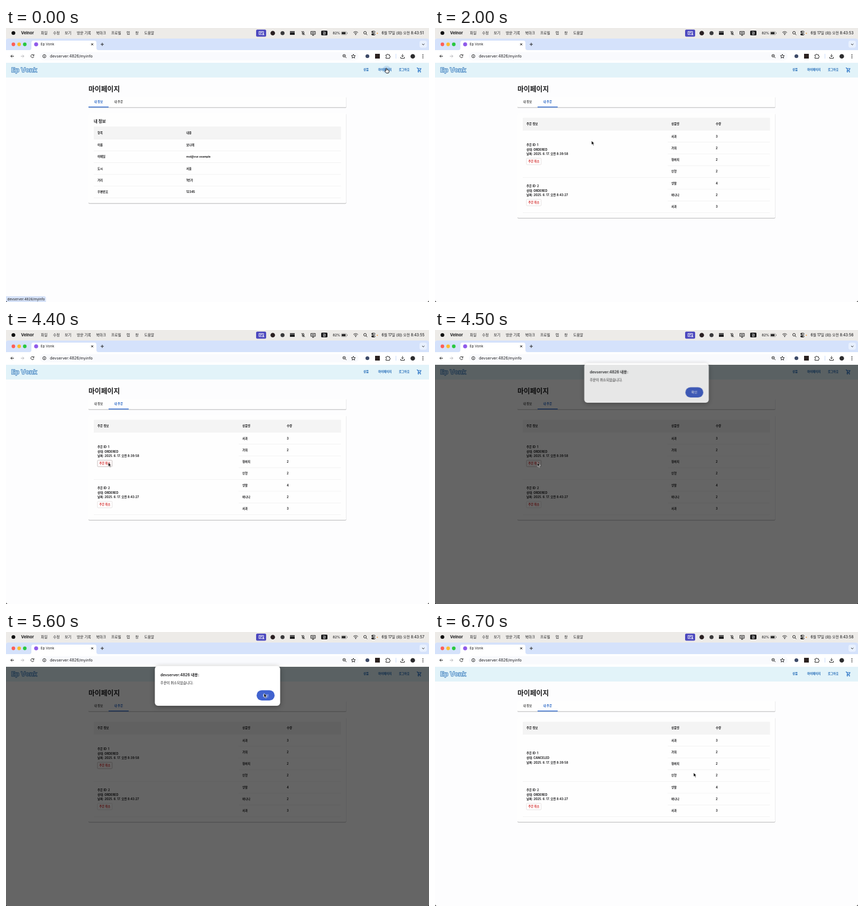
An HTML page that plays this animation: 800x520 px, repeating every 7500 ms.

```html
<!DOCTYPE html>
<html>
<head>
<meta charset="utf-8">
<title>My page</title>
<style>
html, body { margin: 0; width: 100%; height: 100%; overflow: hidden; background: #222; }
svg { display: block; width: 800px; height: 520px; }
text { font-family: Inter, "Noto Sans CJK KR", "Noto Sans CJK JP", sans-serif; fill: #1d1d1f; white-space: pre; }
.menu { font-size: 6.8px; font-weight: 500; }
.bar { font-size: 7.3px; }
.page { font-size: 5.5px; font-weight: 700; }
.nav text { fill: #1b66b5; }
.date { letter-spacing: .06px; }
.mid { text-anchor: middle; }
.line { fill: none; stroke: #1f1f1f; stroke-width: 1; }
.rule { fill: none; stroke: #ececec; stroke-width: .7; }
.paper { fill: #fefefe; filter: drop-shadow(0 1.1px .35px rgba(0,0,0,.3)); }
.btn rect { fill: #fff; stroke: #dfdada; stroke-width: .8; }
.btn text { fill: #d32f2f; font-size: 5.3px; }

.a { animation: 7.5s step-end infinite; }
#cursor { animation-name: move; }
#hand { animation-name: hand; }
#arrow { animation-name: arrow; }
#hover { animation-name: hover; }
#status { animation-name: status; }
#info { animation-name: before; }
#orders { animation-name: after; }
#tab1 { animation-name: tabOff; }
#tab2 { animation-name: tabOn; }
#mark { animation-name: slide; }
#open { animation-name: open; }
#done { animation-name: done; }
#press { animation-name: press; }
#dim { animation-name: dim; }
#alert { animation-name: alert; transform-origin: 400px 102px; }
#ok { animation-name: ok; }
#tick { animation-name: tick; }

@keyframes move {
  0% { transform: translate(718px,76px); animation-timing-function: steps(8); }
  10.667%, 21.333% { transform: translate(212px,137px); animation-timing-function: steps(2); }
  24% { transform: translate(260px,150px); animation-timing-function: steps(2); }
  26.667%, 29.333% { transform: translate(296px,214px); animation-timing-function: steps(3); }
  33.333%, 37.333% { transform: translate(299px,221px); animation-timing-function: steps(8); }
  48%, 60% { transform: translate(193.5px,251.5px); animation-timing-function: steps(6); }
  68%, 74.667% { transform: translate(488px,116.5px); animation-timing-function: step-end; }
  76%, 84% { transform: translate(489px,118px); animation-timing-function: steps(4); }
  89.333%, 100% { transform: translate(489px,267px); }
}
@keyframes hand { 0% { opacity: 1 } 1.333% { opacity: 0 } 9.333% { opacity: 1 } 22.667%, 100% { opacity: 0 } }
@keyframes arrow { 0% { opacity: 0 } 1.333% { opacity: 1 } 9.333% { opacity: 0 } 22.667%, 100% { opacity: 1 } }
@keyframes hover { 0% { opacity: 1 } 1.333%, 100% { opacity: 0 } }
@keyframes status { 0% { opacity: 1 } 8% { opacity: 1; animation-timing-function: steps(3) } 12%, 100% { opacity: 0 } }
@keyframes before { 0% { opacity: 1 } 14.667%, 100% { opacity: 0 } }
@keyframes after { 0% { opacity: 0 } 14.667%, 100% { opacity: 1 } }
@keyframes tabOff { 0% { fill: #2463c4 } 14.667%, 100% { fill: #4a4a4a } }
@keyframes tabOn { 0% { fill: #4a4a4a } 14.667%, 100% { fill: #2463c4 } }
@keyframes slide {
  0% { transform: none }
  14.667% { transform: none; animation-timing-function: cubic-bezier(.4,0,.2,1) }
  18.667%, 100% { transform: translateX(38px) }
}
@keyframes open { 0% { opacity: 1 } 78.667%, 100% { opacity: 0 } }
@keyframes done { 0% { opacity: 0 } 78.667%, 100% { opacity: 1 } }
@keyframes press { 0% { fill: #fff; stroke: #dfdada } 48%, 100% { fill: #fefafa; stroke: #b9b0b0 } }
@keyframes dim { 0% { opacity: 0 } 60% { opacity: .6 } 76%, 100% { opacity: 0 } }
@keyframes alert {
  0% { opacity: 0; transform: translateY(-2px) scale(.994) }
  60% { opacity: .85; transform: translateY(-1.8px) scale(.994) }
  61.333% { opacity: 1; transform: none }
  76% { opacity: .97; transform: translateY(-1.8px) scale(.994) }
  77.333%, 100% { opacity: 0 }
}
@keyframes ok { 0% { fill: #3858c4 } 69.333% { fill: #4163cf } 76%, 100% { fill: #6068c8 } }
@keyframes tick {
  0% { transform: none }
  6.667% { transform: translateY(-12px) }
  20% { transform: translateY(-24px) }
  33.333% { transform: translateY(-36px) }
  46.667% { transform: translateY(-48px) }
  60% { transform: translateY(-60px) }
  73.333% { transform: translateY(-72px) }
  86.667%, 100% { transform: translateY(-84px) }
}
</style>
</head>
<body>
<svg viewBox="0 0 800 520">
  <defs>
    <clipPath id="win"><rect y="20" width="800" height="500" rx="4"/></clipPath>
    <clipPath id="digit"><rect x="780" y="4" width="20" height="12"/></clipPath>
  </defs>

  <!-- menu bar -->
  <rect width="800" height="30" fill="#edebe8"/>
  <circle cx="14" cy="9.5" r="3.6" fill="#111"/>
  <g class="menu">
    <text x="28.5" y="12.2" font-size="7.6" font-weight="700">Velnor</text>
    <text x="66" y="12">파일</text><text x="89" y="12">수정</text><text x="111" y="12">보기</text>
    <text x="134" y="12">방문 기록</text><text x="170.5" y="12">북마크</text><text x="199" y="12">프로필</text>
    <text x="228" y="12">탭</text><text x="244.5" y="12">창</text><text x="261.5" y="12">도움말</text>
    <text x="618" y="12" font-size="6.3">82%</text>
    <text x="787.2" y="12" text-anchor="end" font-size="6.9">6월 17일 (화) 오전 8:43:5</text>
    <g clip-path="url(#digit)"><g id="tick" class="a" font-size="6.9"></g></g>
  </g>
  <rect x="473" y="3" width="19" height="13.5" rx="2.5" fill="#4e4abf"/>
  <path d="M484 12.5H478.5V6.5H487V9M480 8.5H485M480 10.3H483" fill="none" stroke="#fff" stroke-width=".9"/>
  <path d="M484.5 13.3a2 2 0 0 1 4 0z" fill="#fff"/><circle cx="486.5" cy="10" r="1.1" fill="#fff"/>
  <circle cx="504.5" cy="9.7" r="4.3" fill="#2a2022"/>
  <circle cx="523" cy="9.7" r="3.8" fill="#3a3a3c"/>
  <path d="M537 6h9v1.6h-9zM537 8.2h9V13h-9z" fill="#1c1c1e"/>
  <path class="line" d="M560 11.5h4l-.6-1V8a1.5 1.5 0 0 0-3 0v2.5zM561.5 13h1.4M558.8 6l6.4 7.4M576.5 6.5h8.5v5.5h-8.5zM579 14h3.5M580.8 12v2"/>
  <rect x="578" y="8" width="5.5" height="2.5" fill="#777"/>
  <rect x="596" y="5" width="12" height="9" rx="1.8" fill="#1c1c1e"/>
  <text class="mid" x="602" y="11.8" style="fill:#fff;font-size:6px;font-weight:700">한</text>
  <rect x="634" y="6.8" width="10.5" height="6" rx="1.7" fill="none" stroke="#888" stroke-width=".7"/>
  <rect x="635" y="7.8" width="7.3" height="4" rx=".8" fill="#222"/><path d="M645.5 8.7v2.2" stroke="#888"/>
  <path class="line" d="M657 8.5q4.3-3.4 8.6 0M658.7 10.3q2.6-2 5.2 0" stroke-width="1.2"/>
  <circle cx="661.3" cy="12.2" r="1" fill="#1d1d1f"/>
  <circle class="line" cx="679" cy="9" r="2.5"/><path class="line" d="M681 11l2.2 2.3"/>
  <rect class="line" x="691.5" y="6" width="6.5" height="2.8" rx="1.4"/><rect x="691" y="10.3" width="7.5" height="3.6" rx="1.8" fill="#222"/>
  <circle cx="693.2" cy="7.4" r="1.2" fill="#222"/><circle cx="696.5" cy="12.1" r="1" fill="#fff"/>
  <circle cx="702.3" cy="10" r="1.1" fill="#f29a38"/>

  <rect y="500" width="800" height="20" fill="#222"/>
  <g clip-path="url(#win)">
    <!-- browser frame -->
    <rect y="20" width="800" height="500" fill="#fdfdfe"/>
    <rect y="20" width="800" height="22" fill="#d5e2fb"/>
    <path d="M44 42q4 0 4-4V28q0-4 4-4h115q4 0 4 4v10q0 4 4 4z" fill="#fff"/>
    <rect y="42" width="800" height="24" fill="#fff"/>
    <circle cx="14" cy="31" r="3.4" fill="#fe5f57"/><circle cx="24.8" cy="31" r="3.4" fill="#febc2e"/><circle cx="35.5" cy="31" r="3.4" fill="#28c840"/>
    <circle cx="57" cy="31" r="3.8" fill="#8f5bea"/>
    <text x="65.5" y="33.3" font-size="6.6">Ep Vonk</text>
    <path class="line" d="M161 29l4 4m0-4l-4 4M179 31h6m-3-3v6" stroke-width=".9"/>
    <rect x="782" y="24" width="14" height="13.5" rx="4" fill="#e8f0fe"/><path class="line" d="M787 30l2.2 2.2L791.4 30"/>
    <rect x="64" y="46" width="603" height="15.5" rx="7.7" fill="#f9fafd"/>
    <path class="line" d="M15 53.5H9m2.8-2.8L9 53.5l2.8 2.8"/>
    <path class="line" d="M28 53.5h6m-2.8-2.8l2.8 2.8l-2.8 2.8" style="stroke:#b5b5b8"/>
    <path class="line" d="M52.3 51.7a2.9 2.9 0 1 0 .4 2.5M52.9 50v2.3h-2.3"/>
    <circle class="line" cx="72.5" cy="53.5" r="3" stroke-width=".8"/><path class="line" d="M72.5 53v2.2M72.5 51.4v.8" stroke-width=".8"/>
    <text class="bar" x="83" y="56.1">devserver:4826/myinfo</text>
    <circle class="line" cx="639.5" cy="52.7" r="2.5"/><path class="line" d="M641.3 54.5l2.5 2.5M638.2 52.7h2.6"/>
    <path class="line" stroke-width=".9" d="M657 49.8l1.1 2.5 2.7.3-2 1.8.6 2.7-2.4-1.4-2.4 1.4.6-2.7-2-1.8 2.7-.3z"/>
    <circle cx="683.5" cy="53.5" r="3.6" fill="#3d4a68"/>
    <rect x="698" y="49" width="9" height="9" fill="#2b2220"/>
    <path class="line" d="M718.5 51h2.2a1.3 1.3 0 0 1 2.6 0h2.2v2.2a1.3 1.3 0 0 1 0 2.6v1.7h-7v-2a1.2 1.2 0 0 0 0-2.4z"/>
    <path d="M737.5 49v9" stroke="#c9dafa"/>
    <path class="line" d="M750 49.5v5m-2.3-2.2l2.3 2.3l2.3-2.3M746.5 55v2.5h7V55"/>
    <circle cx="769.3" cy="53.7" r="4.3" fill="#2c2c2e"/>
    <g fill="#222"><circle cx="788.5" cy="50.7" r=".9"/><circle cx="788.5" cy="53.7" r=".9"/><circle cx="788.5" cy="56.7" r=".9"/></g>

    <!-- site header -->
    <rect y="66" width="800" height="28" fill="#e2f3f9"/>
    <text x="10" y="83.7" style="font-size:12.1px;font-weight:900;fill:#d3eaf9;stroke:#3a7cba;stroke-width:.8">Ep Vonk</text>
    <circle id="hover" class="a" cx="720" cy="79" r="7.5" fill="#1565c0" fill-opacity=".16"/>
    <g class="page nav"><text x="676" y="81.2">상품</text><text x="704" y="81.2">마이페이지</text><text x="743" y="81.2">로그아웃</text></g>
    <path d="M776.8 75.8h1.6l2 4.2h3l1.5-3H779.5M780.2 80l-1 1.7h5.4" fill="none" stroke="#1565c0" stroke-width="1.1"/>
    <circle cx="779.8" cy="83.4" r=".9" fill="#1565c0"/><circle cx="783.8" cy="83.4" r=".9" fill="#1565c0"/>

    <text x="156" y="120" font-size="12.9" font-weight="900">마이페이지</text>
    <rect class="paper" x="156" y="130" width="487.5" height="20.4" rx="1.5"/>
    <g class="page mid">
      <text id="tab1" class="a" x="175" y="142">내 정보</text>
      <text id="tab2" class="a" x="213" y="142">내 주문</text>
    </g>
    <rect id="mark" class="a" x="156" y="149.2" width="38" height="1.5" fill="#2a66cf"/>

    <g id="info" class="a page">
      <rect class="paper" x="156" y="161.5" width="487.5" height="171" rx="2"/>
      <text x="166" y="179.6" font-size="7.6">내 정보</text>
      <rect x="166" y="187" width="467.5" height="24" fill="#f4f4f4"/>
      <path class="rule" d="M166 211H633.5M166 233.3H633.5M166 255.5H633.5M166 277.8H633.5M166 300H633.5M166 322.3H633.5"/>
      <text x="173" y="200.5">항목</text><text x="341" y="200.5">내용</text>
      <text x="173" y="224">이름</text><text x="341" y="224">보나래</text>
      <text x="173" y="246.2">이메일</text><text x="341" y="246" font-size="5.2">mol@vur.example</text>
      <text x="173" y="268.5">도시</text><text x="341" y="268.5">서울</text>
      <text x="173" y="290.8">거리</text><text x="341" y="290.8">1번가</text>
      <text x="173" y="313">우편번호</text><text x="341" y="313">12345</text>
    </g>

    <g id="orders" class="a page">
      <rect class="paper" x="156" y="161.5" width="487.5" height="199" rx="2"/>
      <rect x="166" y="170.5" width="467.5" height="24.3" fill="#f4f4f4"/>
      <text x="173" y="184.2">주문 정보</text><text x="447" y="184.2">상품명</text><text x="531" y="184.2">수량</text>
      <path class="rule" d="M440 216.5H633.5M440 239H633.5M440 261.3H633.5M166 283.7H633.5M440 306H633.5M440 328.3H633.5M166 350.5H633.5"/>
      <g id="items"></g>
      <g id="open" class="a">
        <text x="173" y="224.2">주문 ID: 1</text><text x="173" y="232.9">상태: ORDERED</text><text class="date" x="173" y="241.4">날짜: 2025. 6. 17. 오전 8:39:58</text>
        <g class="btn"><rect id="press" class="a" x="173" y="247.2" width="27.8" height="12.2" rx="1.5"/><text class="mid" x="186.9" y="255.2">주문 취소</text></g>
      </g>
      <g id="done" class="a">
        <text x="173" y="232.3">주문 ID: 1</text><text x="173" y="241">상태: CANCELED</text><text class="date" x="173" y="249.5">날짜: 2025. 6. 17. 오전 8:39:58</text>
      </g>
      <text x="173" y="302.2">주문 ID: 2</text><text x="173" y="310.9">상태: ORDERED</text><text class="date" x="173" y="319.4">날짜: 2025. 6. 17. 오전 8:43:27</text>
      <g class="btn"><rect x="173" y="325.2" width="27.8" height="12.2" rx="1.5"/><text class="mid" x="186.9" y="333.2">주문 취소</text></g>
    </g>

    <g id="status" class="a">
      <path d="M0 509h72q3.5 0 3.5 3.5V520H0z" fill="#d6e2f8"/>
      <text x="2.5" y="517" font-size="6.4">devserver:4826/myinfo</text>
    </g>

    <rect id="dim" class="a" y="66" width="800" height="454"/>
    <g id="alert" class="a">
      <rect x="281.5" y="64.5" width="237" height="75.5" rx="6" fill="#fff" style="filter:drop-shadow(0 2px 5px rgba(0,0,0,.35))"/>
      <text x="292" y="83.7" font-size="7.2" font-weight="600">devserver:4826 내용:</text>
      <text x="292" y="99.3" font-size="6.4">주문이 취소되었습니다.</text>
      <rect id="ok" class="a" x="474" y="110.5" width="34" height="19.5" rx="9.75"/>
      <text class="mid" x="491" y="122.5" style="fill:#fff;font-size:6.2px;font-weight:500">확인</text>
    </g>
  </g>

  <g id="cursor" class="a" stroke-linejoin="round">
    <path id="arrow" class="a" d="M0 0V7.6L1.8 6L3.1 9L4.5 8.4L3.2 5.5H5.6Z" fill="#000" stroke="#fff" stroke-width=".7"/>
    <path id="hand" class="a" d="M.6 5.2V.8q.9-1.2 1.7 0V3.4q1-.6 1.5.3q1-.4 1.4.4q1.2-.2 1.2.9V7L5.5 9.5H1.3L-1.8 5.9q.4-1.3 1.5-.6z" fill="#fff" stroke="#000" stroke-width=".9"/>
  </g>
</svg>
<script>
const put = (id, x, y, s) => {
  const el = document.createElementNS("http://www.w3.org/2000/svg", "text");
  el.setAttribute("x", x);
  el.setAttribute("y", y);
  el.textContent = s;
  document.getElementById(id).append(el);
};
const items = [["사과", 3], ["가위", 2], ["청바지", 2], ["인형", 2], ["양말", 4], ["바나나", 2], ["사과", 3]];
items.forEach(([name, count], i) => {
  const y = 207.5 + i * 22.27;
  put("items", 447, y, name);
  put("items", 531, y, count);
});
for (let i = 0; i < 8; i++) put("tick", 787.3, 12 + i * 12, i + 1);
</script>
</body>
</html>
```
